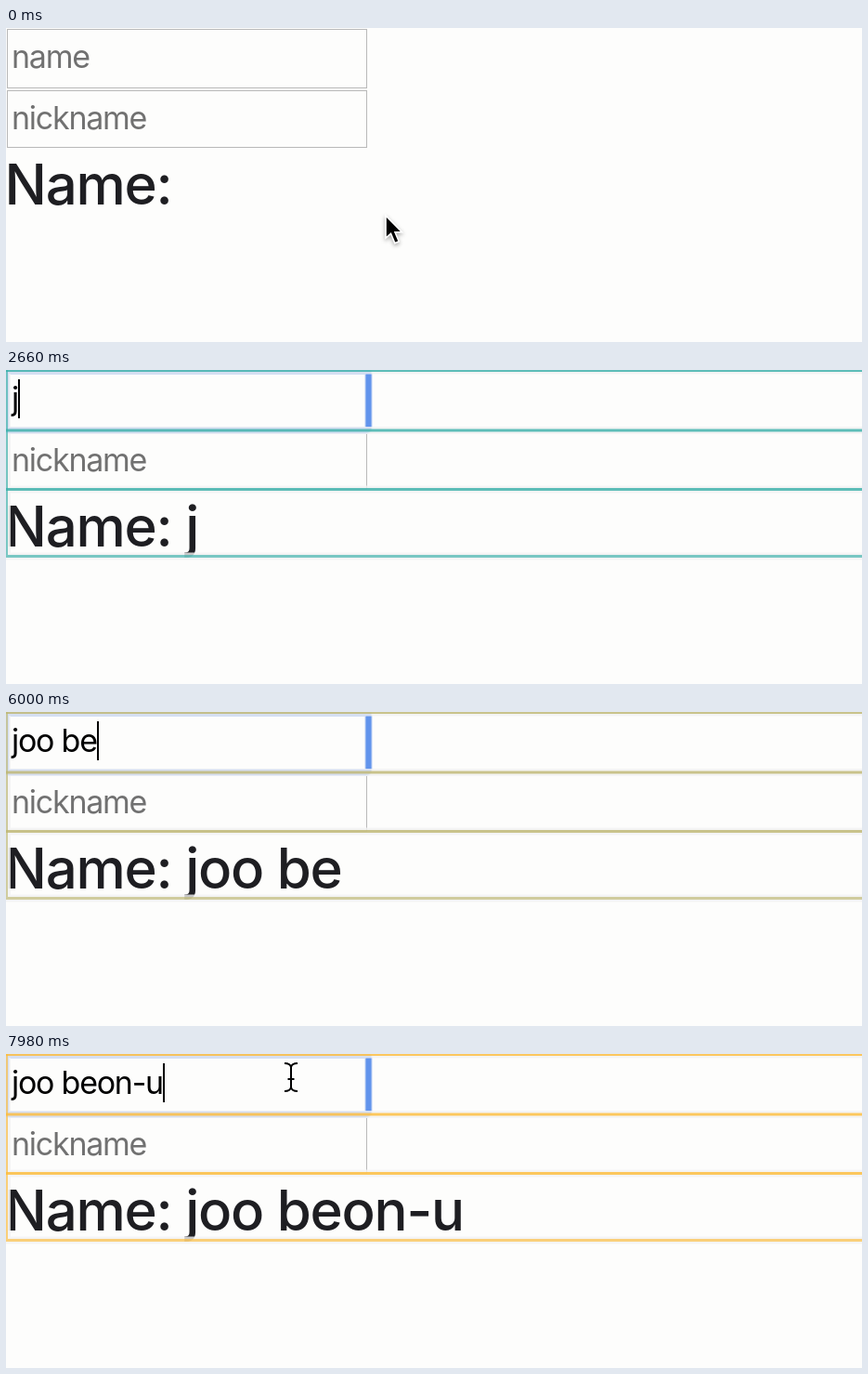
Write an HTML page that moves like this. It is 922 by 338 pixels and loops after 8 s.

```html
<!DOCTYPE html>
<html lang="en">
<head>
<meta charset="utf-8">
<title>Controlled inputs</title>
<style>
  html, body { margin: 0; width: 100%; height: 100%; overflow: hidden; background: #fdfdfc; }
  #stage { position: relative; width: 922px; height: 338px; overflow: hidden; font-family: Inter, sans-serif; }
  svg { position: absolute; left: 0; top: 0; }
  .field, h2 { position: absolute; margin: 0; white-space: pre; }
  .field { left: 6px; font-size: 34px; line-height: 42px; letter-spacing: -1.25px; color: #000; }
  .hint { color: #717171; }
  h2 { left: -1.5px; top: 132px; font-size: 60px; line-height: 72px; font-weight: 500; letter-spacing: -1.25px; color: #1e1e22; }
  #caret { display: inline-block; width: 2px; height: 42px; vertical-align: top; background: #000; }
  .box { fill: none; stroke: #b9b9b9; }
</style>
</head>
<body>
<div id="stage">
  <svg width="922" height="338">
    <rect class="box" x="1.5" y="1.5" width="387" height="63"/>
    <rect class="box" x="1.5" y="67.5" width="387" height="61"/>
    <g id="ring" fill="none">
      <rect x="0" y="1" width="390.5" height="64" rx="3" stroke="#bed2f4" stroke-width="8"/>
      <rect x="0" y="1" width="390.5" height="64" rx="3" stroke="#6294ec" stroke-width="6"/>
    </g>
  </svg>
  <div class="field" style="top:10.3px"><span id="value"></span><span id="caret"></span></div>
  <div class="field hint" id="hint" style="top:10.3px">name</div>
  <div class="field hint" style="top:76.3px">nickname</div>
  <h2 id="heading"></h2>
  <svg width="922" height="338">
    <g id="updates" fill="none">
      <g stroke="#f3f3f3" stroke-opacity=".8" stroke-width="8">
        <path d="M0 .5H922M0 65H922M0 128.5H922M0 200.5H922M1 0V202"/>
      </g>
      <g id="lines" stroke-width="3" stroke-opacity=".8">
        <path d="M0 .5H922M0 65H922M0 128.5H922"/>
        <path d="M0 200.5H922M.5 0V202" stroke-opacity=".65"/>
      </g>
    </g>
    <path id="arrow" d="M0 0V24L5.5 19.3L9.8 29.6L14.2 27.8L10 17.8H17.5Z"
      fill="#000" stroke="#fff" stroke-width="1.6" style="filter:drop-shadow(0 2px 2px #0005)"/>
    <path id="beam" d="M-7-15Q-1-15 0-11Q1-15 7-15M-7 15Q-1 15 0 11Q1 15 7 15M0-11V11M-3.5 2H3.5"
      fill="none" stroke="#000" stroke-width="2"/>
  </svg>
</div>
<script>
  const LOOP = 8000, FOCUS = 1100, SHOW_AGAIN = 7800;
  const typed = 'joo beon-u';
  const keyTimes = [2520, 3240, 3900, 4560, 5200, 5800, 6350, 6750, 7100, 7560];
  const heat = ['#37afa9', '#63b19e', '#80b393', '#97b488', '#abb67d',
                '#beb771', '#cfb965', '#dfba57', '#efbb49', '#febc38'];
  const el = id => document.getElementById(id);
  const show = (id, on) => { el(id).style.visibility = on ? 'visible' : 'hidden'; };
  const ease = (t, from, to) => {
    const p = Math.min(1, Math.max(0, (t - from) / (to - from)));
    return p * p * (3 - 2 * p);
  };

  function drawPointer(t) {
    const move = ease(t, 20, 800), drift = ease(t, 860, 1060);
    const x = 409 - 89 * move - 13 * drift, y = 202 - 177 * move;
    const visible = t < keyTimes[0] || t >= SHOW_AGAIN;
    const overInput = x < 389 && y < 128;
    for (const id of ['arrow', 'beam']) el(id).setAttribute('transform', `translate(${x} ${y})`);
    show('arrow', visible && !overInput);
    show('beam', visible && overInput);
  }

  function draw(t) {
    const count = keyTimes.filter(k => k <= t).length;
    const text = typed.slice(0, count);
    const lastInput = count ? keyTimes[count - 1] : FOCUS;
    el('value').textContent = text;
    el('heading').textContent = 'Name: ' + text;
    show('hint', !count);
    show('ring', t >= FOCUS);
    show('caret', t >= FOCUS && (t - lastInput) % 2000 < 1000);
    show('updates', count);
    if (count) el('lines').setAttribute('stroke', heat[count - 1]);
    drawPointer(t);
  }

  const start = performance.now();
  function tick() {
    draw((performance.now() - start) % LOOP);
    requestAnimationFrame(tick);
  }
  tick();
</script>
</body>
</html>
```
